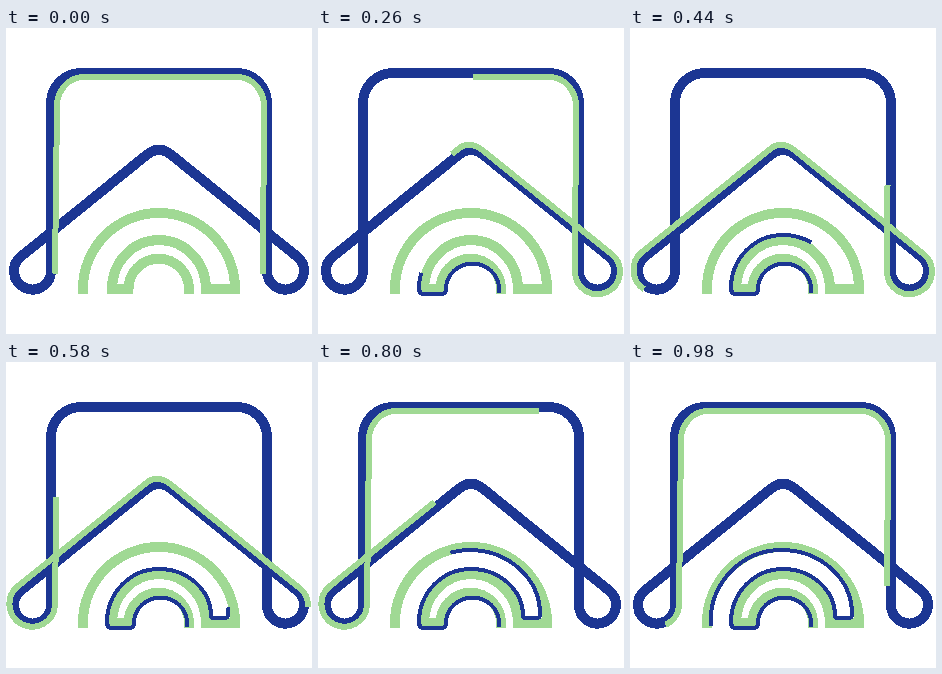
An HTML page without scripts that plays this animation: 306 px wide and 306 px high, repeating every 1000 ms.

```html
<!DOCTYPE html>
<html lang="en">
<head>
<meta charset="utf-8">
<title>House loader</title>
<style>
  :root { --blue: #1c3693; --green: #a0d994; }
  html, body { margin: 0; width: 100%; height: 100%; overflow: hidden; background: #fff; }
  svg { display: block; width: 100%; height: 100%; shape-rendering: crispEdges; }
  path { fill: none; }
  .house { stroke: var(--blue); stroke-width: 10; }
  .arches { stroke: var(--green); stroke-width: 10; }
  .runner {
    stroke: var(--green);
    stroke-width: 6;
    stroke-dasharray: 577 533;
    animation: run 1s linear infinite;
  }
  .tracer {
    stroke: var(--blue);
    stroke-width: 4;
    stroke-dasharray: 600;
    animation: trace 1s linear infinite;
  }
  @keyframes run { from { stroke-dashoffset: 3.5; } to { stroke-dashoffset: -1106.5; } }
  @keyframes trace { from { stroke-dashoffset: 606; } to { stroke-dashoffset: 69; } }
</style>
</head>
<body>
<svg viewBox="0 0 306 306">
  <path class="house" d="M45 243V75A30 30 0 0 1 75 45H231A30 30 0 0 1 261 75V243
    A18.5 18.5 0 1 0 291.1 228.6L165 126.6Q153 116.9 141 126.6L14.9 228.6A18.5 18.5 0 1 0 45 243Z"/>
  <path class="arches" d="M77 266V261A76 76 0 0 1 229 261H200A47 49 0 0 0 106 261
    H122.5A30.25 30.25 0 0 1 183 261V266"/>
  <path class="tracer" d="M181 265V261A26.5 25.5 0 0 0 128 261Q128 266 123 266H106Q101 266 101 260
    A52 53 0 0 1 153 207A52 47 0 0 1 205 254Q205 256 208 256H219Q222 256 222 252
    A70.5 64 0 0 0 151.5 188A71 72 0 0 0 80.5 260V266"/>
  <path class="runner" pathLength="1110" d="M49 243.5L51 78A27 29 0 0 1 78 49H231A27 29 0 0 1 258 78L257 243.5
    A22.5 22.5 0 1 0 293.5 226L165 122.6Q151.6 111.8 140.5 120.8L11.5 224.5A22.8 22.8 0 1 0 49 243.5Z"/>
</svg>
</body>
</html>
```
